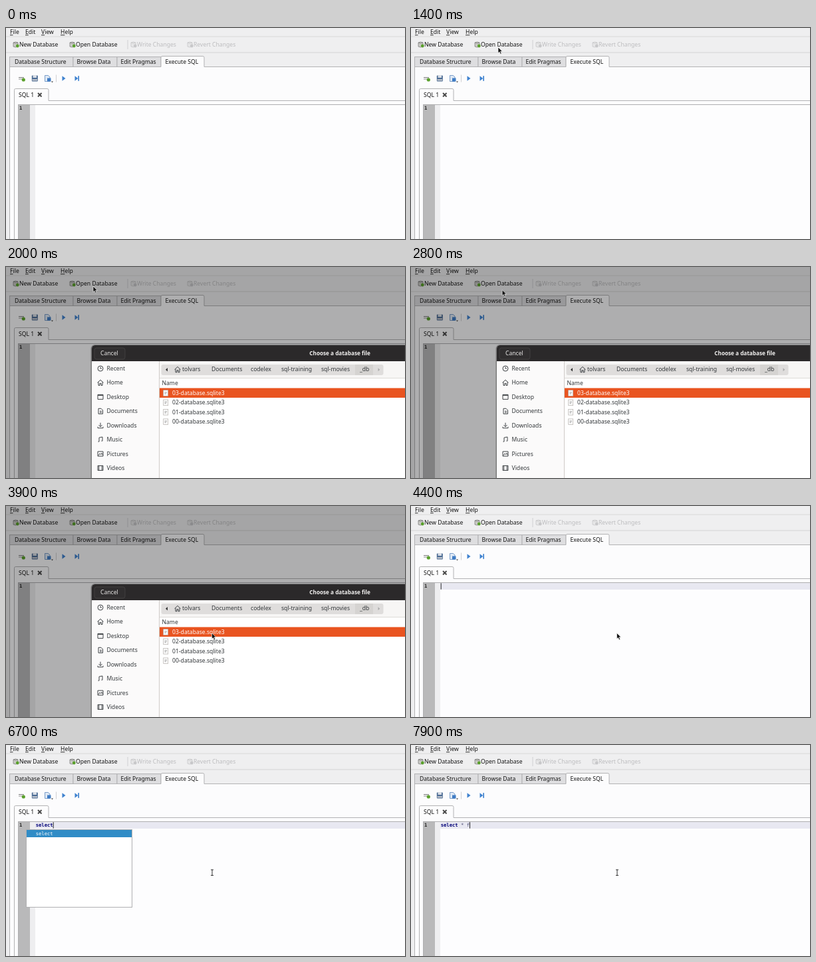
An HTML page that plays this animation: 600x318 px, repeating every 8 s.

```html
<!DOCTYPE html>
<html lang="en">
<head>
<meta charset="utf-8">
<title>SQL editor</title>
<style>
  html, body { margin: 0; width: 100%; height: 100%; overflow: hidden; background: #efeff0; }
  svg { display: block; width: 100vw; height: 100vh; }
  text { font: 8.6px "Noto Sans", "Open Sans", sans-serif; fill: #141414; white-space: pre; }
  .u { text-decoration: underline; }
  .off { fill: #bdbdbf; }
  .side, .path { fill: #33373a; }
  .head { font-weight: 700; font-size: 8.2px; fill: #f3f2f1; }
  .code { font: 7.2px "DejaVu Sans Mono", monospace; fill: #45456c; }
  .key { font-weight: 700; fill: #000078; }
  .line { fill: none; stroke: #b2b2b4; }
</style>
</head>
<body>
<svg id="stage" viewBox="0 0 600 318"></svg>
<script>
const text = (x, y, s, cls = '') => `<text x="${x}" y="${y}" class="${cls}">${s}</text>`;
const rect = (x, y, w, h, fill, more = '') =>
  `<rect x="${x}" y="${y}" width="${w}" height="${h}" fill="${fill}" ${more}/>`;
const path = (d, fill, more = '') => `<path d="${d}" fill="${fill}" ${more}/>`;
const stroke = (d, color, width = 1) => path(d, 'none', `stroke="${color}" stroke-width="${width}"`);
const dot = (x, y, r, fill) => `<circle cx="${x}" cy="${y}" r="${r}" fill="${fill}"/>`;
const group = (id, body, more = '') => `<g id="${id}" ${more}>${body}</g>`;

function database(x, badge, body = '#c9c9c5', edge = '#777') {
  return path(`M${x} 22v6q3.5 2 7 0v-6q-3.5-2-7 0q3.5 2 7 0`, body,
    `stroke="${edge}" stroke-width=".7"`) + dot(x + 6.3, 27, 2.4, badge);
}

function menuBar() {
  return [[6, 'File'], [29, 'Edit'], [53, 'View'], [82, 'Help']].map(([x, s]) =>
    text(x, 9.3, `<tspan class="u">${s[0]}</tspan>${s.slice(1)}`)).join('');
}

function toolBar() {
  return rect(0, 12.5, 600, 1, '#d9d9da') + rect(0, 36.5, 600, 1, '#d3d3d5') +
    database(11, '#5aa02c') + text(20, 28, 'New Database') +
    database(96, '#5aa02c') + text(105, 28, 'Open Database') +
    rect(182.5, 18, 1, 14, '#cfcfd1') +
    database(188, '#c8c8ca', '#e6e6e7', '#c4c4c6') + text(197, 28, 'Write Changes', 'off') +
    database(273, '#c8c8ca', '#e6e6e7', '#c4c4c6') + text(282, 28, 'Revert Changes', 'off');
}

function tabs() {
  const names = [[5.5, 95.5, 'Database Structure'], [101, 66, 'Browse Data'], [167, 66, 'Edit Pragmas']];
  return names.map(([x, w, s]) =>
      rect(x, 43.5, w, 15, '#dedee0', 'stroke="#b2b2b4"') + text(x + 5.4 + (x < 9 ? 2 : 0), 54, s)).join('') +
    rect(5.5, 58.5, 620, 300, '#fcfcfd', 'stroke="#b2b2b4"') +
    path('M233 59V44.5q0-2 2-2h61q2 0 2 2V59', '#fcfcfd', 'stroke="#b2b2b4"') +
    rect(233.5, 58, 64, 1.5, '#fcfcfd') + text(239.6, 53.5, 'Execute SQL');
}

function editorIcons() {
  return rect(19, 74, 8, 1.2, '#888') + rect(19, 76.5, 7, 1.2, '#aaa') + dot(26.3, 78, 2.6, '#5aa02c') +
    rect(38.8, 71.5, 9, 9, '#4b6b94', 'rx="1"') + rect(40.5, 71, 5.5, 4, '#d8dde5') +
    rect(39.5, 77, 7.5, 2.5, '#b8bec8') +
    path('M58.5 71.5h5l2.5 2.5v6.5h-7.5z', '#dfe9f5', 'stroke="#5b87bd" stroke-width=".8"') +
    rect(62, 75.5, 5.5, 5, '#3f7cc4') + path('M68 80.5h3l-1.5 1.8z', '#333') +
    rect(75, 70.5, 1, 11, '#d0d0d2') +
    path('M84.5 72.2l5 3.8-5 3.8z', '#3f82cf') +
    path('M103.5 72.2l4.8 3.8-4.8 3.8z', '#3f82cf') + rect(108.3, 72.2, 1.7, 7.6, '#3f82cf');
}

function editor() {
  return rect(12.5, 109.5, 620, 250, '#fcfcfd', 'stroke="#b2b2b4"') +
    path('M12.5 110V93.500q0-2 2-2h47.500q2 0 2 2V110', '#fcfcfd', 'stroke="#b2b2b4"') +
    rect(13, 109, 50.5, 1.5, '#fcfcfd') + text(19, 104, 'SQL 1') +
    stroke('M48 98l5.500 5.500m0-5.500l-5.500 5.500', '#484848', 1.9) +
    rect(18.5, 115.5, 620, 250, '#fdfdfe', 'stroke="#aeaeb0"') +
    rect(19, 116, 17, 202, '#b9b9ba') + rect(36, 116, 8, 202, '#eeeef0') +
    rect(44, 116, 556, 10, '#e8e8f1', 'id="current"') +
    text(20, 123.3, '1', 'code" style="font-weight:700;fill:#222') +
    `<text id="code" class="code" x="44.7" y="123.300"></text>` +
    rect(44.7, 116.3, .9, 9.4, '#111', 'id="caret"') +
    group('popup', rect(30.5, 127.5, 159, 117, '#fff', 'stroke="#b0b0b2"') +
      rect(31, 128, 158, 11, '#308cc6') + text(44.7, 136, 'select', 'code" style="fill:#fff'));
}

// Small outline icons for the sidebar, drawn around their centre.
const glyphs = {
  Recent: 'M-4 0a4 4 0 1 0 8 0a4 4 0 1 0-8 0M0-2.500V0h2',
  Home: 'M-4.500 0L0-4.300 4.500 0M-3-1v5h2V1h2v3h2v-5',
  Desktop: 'M-4-3.500h8v7h-8zM-4-2.300h8',
  Documents: 'M-3-4h4l2.500 2.500V4H-3zM-1 0h3M-1 2h3',
  Downloads: 'M0-4V2M-2.500-.500L0 2l2.500-2.500M-4 2v2h8V2',
  Music: 'M-2 3v-6l5-1v6M-3.500 3h1.500M1.500 2H3',
  Pictures: 'M-4-3.500h8v7h-8zM-3 2.500l2-3 1.500 1.500L2-1l1.500 3',
  Videos: 'M-4-3.500h8v7h-8zM-2.300-3.500v7M2.300-3.500v7'
};

function dialog() {
  const side = Object.entries(glyphs).map(([name, d], i) => {
    const y = 153 + i * 21.43;
    return `<g transform="translate(142 ${y})">${stroke(d, '#3f4346', 1)}</g>` + text(151.5, y + 3, name, 'side');
  }).join('');
  const crumbs = [[265, 'tolvars'], [309, 'Documents'], [368, 'codelex'], [414, 'sql-training'],
    [474, 'sql-movies'], [532, '_db']].map(([x, s]) => text(x, 157.4, s, 'path')).join('');
  const files = [3, 2, 1, 0].map((n, i) => {
    const y = 190 + i * 14.4;
    return rect(236.7, y - 4.3, 7, 8.6, '#fafafa', 'stroke="#b5b1ad" stroke-width=".7"') +
      stroke(`M238.500 ${y - 1}h3.500m-3.500 2h2.500`, '#888', .8) +
      text(250, y + 3, `0${n}-database.sqlite3`, i ? 'path' : '" style="fill:#fff');
  }).join('');
  return rect(127.5, 117, 480, 210, '#000', 'rx="6" opacity=".3"') +
    path('M129 318V123q0-5 5-5H600V318z', '#fff') +
    path('M129 142V123q0-5 5-5H600V142z', '#2b292a') +
    rect(133, 122, 46, 17, '#302e2f', 'rx="3" stroke="#474546" stroke-width=".8"') +
    text(142, 133.3, 'Cancel', '" style="fill:#e9e8e7') + text(456.3, 133.2, 'Choose a database file', 'head') +
    rect(129, 142, 101, 176, '#fbfafa') + rect(230, 142, 1, 176, '#cfcbc8') +
    rect(231, 142, 369, 25, '#f7f6f5') + rect(231, 167, 369, 1, '#dedbd8') +
    rect(233.5, 147, 334, 16, '#dfdddc', 'rx="3"') + rect(525, 147, 27, 16, '#d5d3d1') +
    path('M243 152v5.500l-3-2.750z', '#333') + path('M559.500 152.300v5l2.700-2.500z', '#aaa') +
    `<g transform="translate(258 154.700)">${stroke(glyphs.Home, '#3f4346')}</g>` + crumbs +
    text(234.5, 178.2, 'Name', 'path') +
    rect(231, 182.5, 369, 14.5, '#e95420') + files + side;
}

const $ = id => document.getElementById(id);
$('stage').innerHTML = rect(0, 0, 600, 318, '#efeff0') + menuBar() + toolBar() + tabs() +
  editorIcons() + editor() + rect(0, 0, 600, 318, '#000', 'id="dim"') + group('dialog', dialog()) +
  group('arrow', path('M0 0v8.800l2-1.900 1.500 3.300 1.600-.700-1.500-3.200h2.800z', '#111',
    'stroke="#fff" stroke-width=".6"')) +
  group('beam', stroke('M-2 -4.500h4m-2 0v8.500m-2 0h4', '#333', 1), 'transform="translate(310 192.500)"');

const loop = 8000;
const query = 'select * f';
const keyTimes = [5600, 5900, 6100, 6300, 6500, 6700, 7000, 7400, 7600, 7900];
const charWidth = 4.335;

const ramp = (t, a, b) => Math.min(1, Math.max(0, (t - a) / (b - a)));
const ease = p => p * p * (3 - 2 * p);
const show = (id, on) => $(id).style.display = on ? '' : 'none';

function pointer(t) {
  if (t < 2700) {
    const p = ease(ramp(t, 100, 900));
    return [150 - 19 * p, 152 - 123 * p];
  }
  const p = ease(ramp(t, 2700, 3600));
  return [131 + 178.5 * p, 29 + 162.5 * p];
}

function caretOn(t, typed) {
  return t >= 4300 && (typed > 0 || t < 4800 || t >= 5300);
}

function draw(t) {
  const typed = keyTimes.filter(k => k <= t).length;
  const s = query.slice(0, typed);
  $('code').innerHTML = typed < 6 ? s : `<tspan class="key">select</tspan>${s.slice(6)}`;
  $('caret').setAttribute('x', 44.7 + typed * charWidth);
  $('dim').setAttribute('opacity', .31 * ramp(t, 1550, 2000) * (1 - ramp(t, 3950, 4250)));
  $('arrow').setAttribute('transform', `translate(${pointer(t)})`);
  show('caret', caretOn(t, typed));
  show('current', t >= 4300);
  show('popup', t >= 6100 && t < 7000);
  show('dialog', t >= 1500 && t < 4000);
  show('arrow', t >= 200 && t < 4600);
  show('beam', t >= 4600);
}

function tick() {
  draw(Math.floor(performance.now() % loop / 100) * 100);
  requestAnimationFrame(tick);
}
tick();
</script>
</body>
</html>
```
